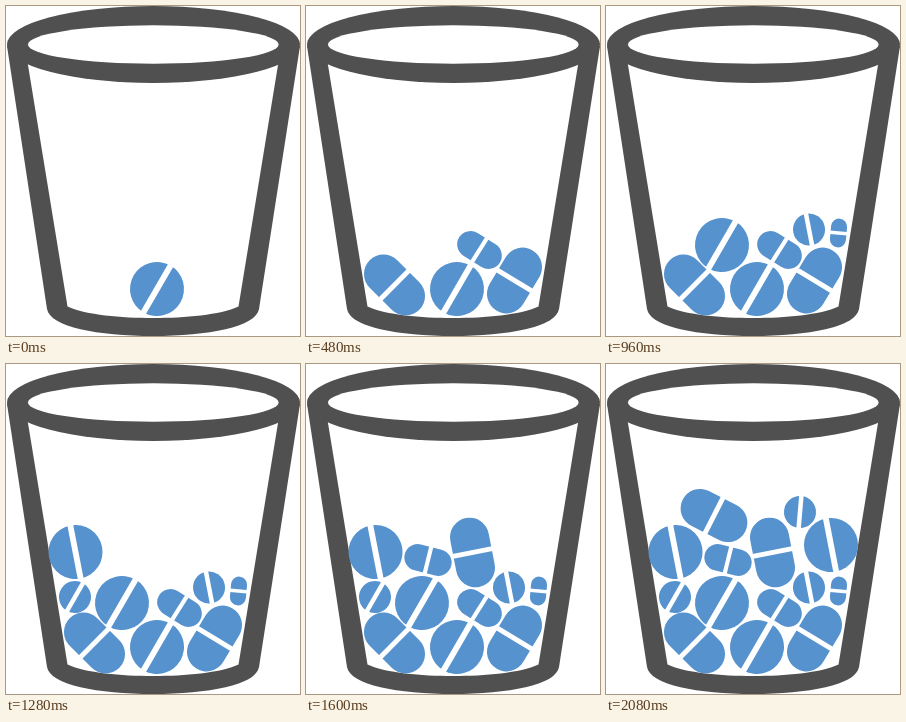
Animation of 294 by 330 pixels, one loop 2240 ms. Source, as an HTML page:

```html
<!DOCTYPE html>
<html lang="en">
<head>
<meta charset="utf-8">
<title>Filling glass</title>
<style>
  html, body { margin: 0; width: 100%; height: 100%; overflow: hidden; background: #fff; }
  svg { display: block; width: 294px; height: 330px; }
  .wall { fill: #505050; }
  .hollow { fill: #fff; }
  .body { stroke: #5692ce; stroke-linecap: round; }
  .split { stroke: #fff; }
</style>
</head>
<body>
<svg viewBox="0 0 294 330">
  <path class="wall" d="M1 40 L41 303 C44 321 92 330 147 330 S250 321 253 303 L294 40Z"/>
  <path class="hollow" d="M21.5 56 L61.5 300.5 C80 309 115 312 147 312 S214 309 232.5 300.5 L272.5 56Z"/>
  <ellipse class="wall" cx="147.5" cy="38.5" rx="146.5" ry="38.5"/>
  <ellipse class="hollow" cx="147.3" cy="38.5" rx="125.3" ry="19.2"/>
  <g id="pills"></g>
</svg>
<script>
  const STEP = 160;
  const SLANTED = 30, UPRIGHT = -11;
  const layer = document.getElementById('pills');

  // A pill is a round-capped bar, cut in the middle by a gap that grows with its size.
  function pill(x, y, radius, length, angle) {
    const gap = 2.5 + radius / 8;
    layer.insertAdjacentHTML('beforeend', `
      <g transform="translate(${x} ${y}) rotate(${angle})">
        <path class="body" stroke-width="${2 * radius}" d="M${-length / 2} 0H${length / 2}"/>
        <path class="split" stroke-width="${gap}" d="M0 ${-radius - 0.5}V${radius + 0.5}"/>
      </g>`);
  }

  const tablet = radius => (x, y, angle) => pill(x, y, radius, 0, angle);
  const capsule = radius => (x, y, angle) => pill(x, y, radius, 1.6 * radius, angle);

  const bigTablet = tablet(27), smallTablet = tablet(16);
  const bigCapsule = capsule(19.5), smallCapsule = capsule(13.3), tinyCapsule = capsule(8);

  // In the order they appear
  bigTablet(151, 283, SLANTED);
  bigCapsule(88.5, 279, 45);
  bigCapsule(208.5, 274.5, 121);
  smallCapsule(173.5, 244, 32);
  smallTablet(203, 223.5, UPRIGHT);
  tinyCapsule(232.5, 227, 95);
  bigTablet(116, 239, SLANTED);
  smallTablet(69, 233, SLANTED);
  bigTablet(69.5, 188, UPRIGHT);
  smallCapsule(122, 196, 14);
  bigCapsule(166.5, 188.5, 79);
  bigTablet(225, 181, UPRIGHT);
  smallTablet(194, 148, 5);
  bigCapsule(108, 151.5, 27);

  const items = [...layer.children];

  function draw(time) {
    const last = Math.floor(time / STEP) % items.length;
    items.forEach((el, i) => {
      el.style.visibility = i <= last ? 'visible' : 'hidden';
    });
  }

  function tick() {
    draw(performance.now());
    requestAnimationFrame(tick);
  }

  draw(0);
  requestAnimationFrame(tick);
</script>
</body>
</html>
```
